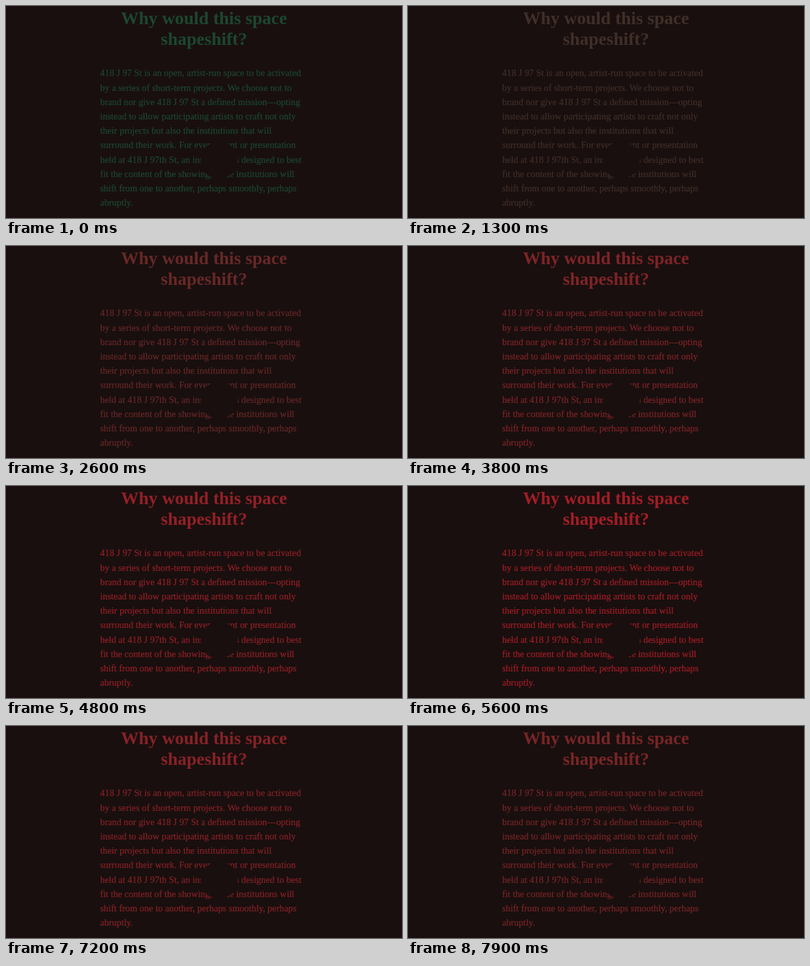
Write an HTML page that moves like this. It is 610 by 327 pixels and loops after 8000 ms.

```html
<!DOCTYPE html>
<html lang="en">
<head>
<meta charset="utf-8">
<title>Why would this space shapeshift?</title>
<style>
  :root { --bg: #190f0f; }
  html, body {
    margin: 0;
    width: 100%;
    height: 100%;
    overflow: hidden;
    background: var(--bg);
  }
  svg { display: block; }
  text {
    font-family: "Liberation Serif", "Times New Roman", serif;
    fill: currentColor;
  }
  .page { animation: tint 8s linear infinite; }
  .title { font-size: 27.5px; font-weight: 700; text-anchor: middle; }
  .body { font-size: 14.4px; stroke: currentColor; stroke-width: 0.2px; }
  .hole { fill: var(--bg); }

  /* Green warms to red, then starts to fade back. */
  @keyframes tint {
    0%     { color: #1c472f; }
    16.25% { color: #402f28; }
    32.5%  { color: #672827; }
    47.5%  { color: #7e2427; }
    70%    { color: #a21d25; }
    73%    { color: #a61c25; }
    80%    { color: #971f26; }
    100%   { color: #762526; }
  }
</style>
</head>
<body>
<svg width="610" height="327" viewBox="0 0 610 327">
  <g class="page">
    <text class="title" x="305" y="28.4">Why would this space</text>
    <text class="title" x="305" y="60.4">shapeshift?</text>
    <text class="body" y="108.3">
      <tspan x="145">418 J 97 St is an open, artist-run space to be activated</tspan>
      <tspan x="145" dy="22.2">by a series of short-term projects. We choose not to</tspan>
      <tspan x="145" dy="22.2">brand nor give 418 J 97 St a defined mission—opting</tspan>
      <tspan x="145" dy="22.2">instead to allow participating artists to craft not only</tspan>
      <tspan x="145" dy="22.2">their projects but also the institutions that will</tspan>
      <tspan x="145" dy="22.2">surround their work. For every event or presentation</tspan>
      <tspan x="145" dy="22.2">held at 418 J 97th St, an institution is designed to best</tspan>
      <tspan x="145" dy="22.2">fit the content of the showing, these institutions will</tspan>
      <tspan x="145" dy="22.2">shift from one to another, perhaps smoothly, perhaps</tspan>
      <tspan x="145" dy="22.2">abruptly.</tspan>
    </text>
  </g>
  <circle class="hole" cx="328.5" cy="237.5" r="28.5"/>
</svg>
</body>
</html>
```
